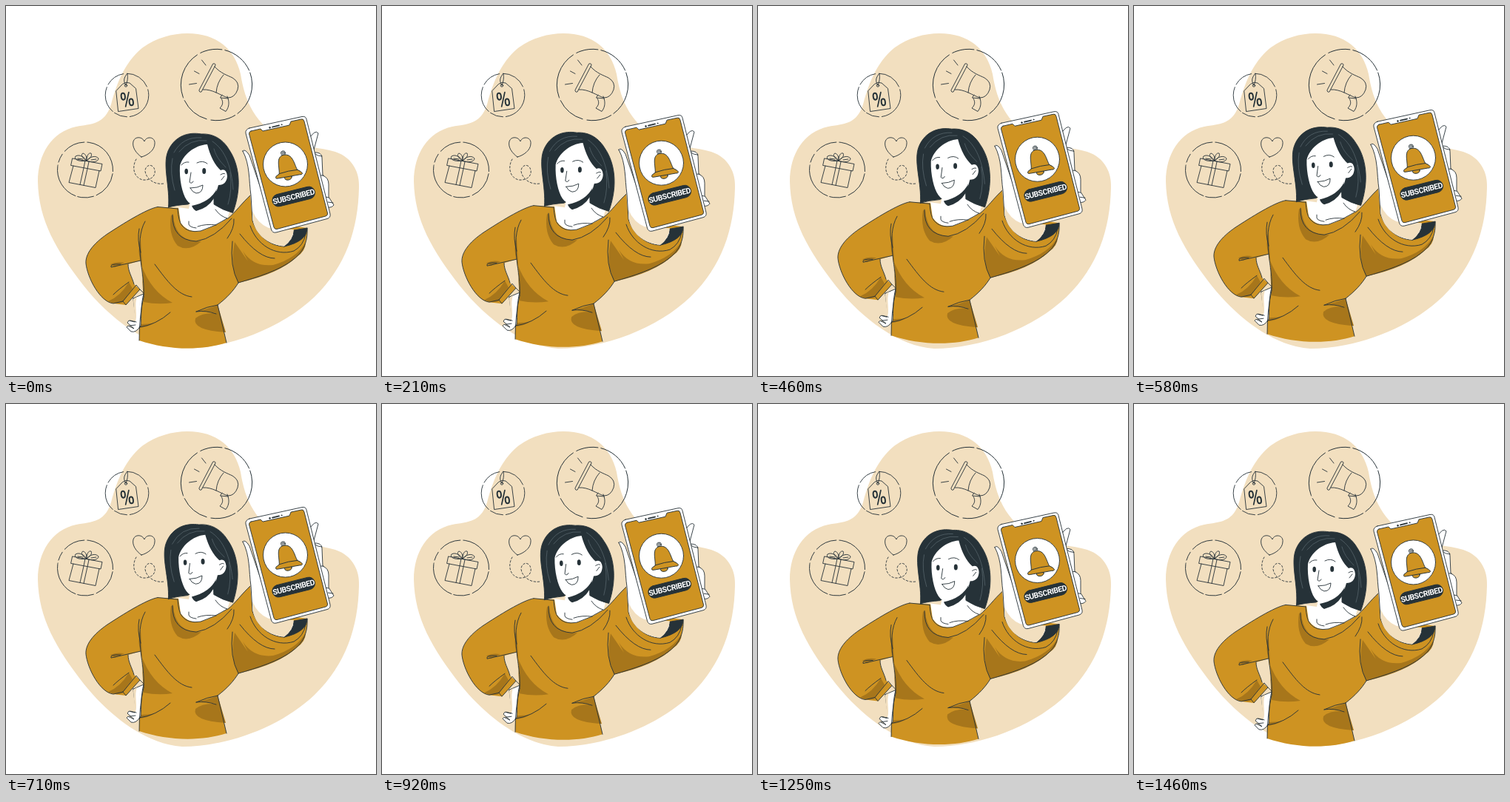
An HTML page for the animation above (1.5 s loop, 500 by 500 pixels).

```html
<!DOCTYPE html>
<html lang="en">
<head>
<meta charset="utf-8">
<title>Subscribed</title>
<style>
  html, body { margin: 0; width: 100%; height: 100%; overflow: hidden; background: #fff; }
  svg { display: block; width: 100%; height: 100%; }
  path, circle, ellipse, rect { fill: none; stroke: #263238; stroke-width: .9; stroke-linecap: round; stroke-linejoin: round; }
  .sand { fill: #f2dfbf; stroke: none; }
  .gold { fill: #ce9322; }
  .shade { fill: #a7761b; stroke: none; }
  .white { fill: #fff; }
  .dark { fill: #263238; }
  .bare { stroke: none; }
  .strand { stroke: #65747b; stroke-width: .6; }
  text { font: 600 10.5px Roboto, sans-serif; font-stretch: 75%; letter-spacing: -.45px; fill: #fff; text-anchor: middle; }
</style>
</head>
<body>
<svg viewBox="0 0 500 500">
  <path class="sand" d="M245 37C285 37 309 58 317 92C323 130 337 160 375 180C400 191 425 191 445 197C469 205 478 226 477 245C476 302 459 352 417 393C372 436 300 463 238 463C190 460 140 422 105 378C68 330 44 290 43 237C43 200 62 170 95 163C115 159 133 161 142 133C152 95 165 72 185 56C203 43 225 37 245 37Z"/>

  <g id="gift">
    <circle cx="107" cy="221.500" r="37.500" stroke-dasharray="38 4 22 3 52 4 12 5 30 4 58 4" transform="rotate(8 107 221.500)"/>
    <path d="M90 206L130 213.500L128 223L88 215.500ZM91 216L85 238.500L121 245.500L126 222.500M107 209L105 219L100 241.500M112 210.500L110 220L105 242.500"/>
    <path d="M109 209C98 211 91 207 94 203C99 200 106 204 109 209C115 212 125 211 125 206C121 201 113 204 109 209C102 205 101 200 104 199C108 200 109 204 109 209C109 203 111 198 115 199C117 203 113 206 109 209M97 206L104 207M115 208L122 207"/>
  </g>

  <g id="tag">
    <circle cx="163.500" cy="120.500" r="29.300" stroke-dasharray="42 4 18 3 36 4 26 5 34 4"/>
    <path d="M149 114.500L157.500 105.500Q162 102 167 104L175.500 111.500L179 138.500L152 142.500ZM162 107C157 100 161 95 164 91C165 97 164 103 162 107"/>
    <circle cx="162" cy="107.500" r="1.700"/>
    <g transform="rotate(-7 164 126)" style="stroke-width:2">
      <ellipse cx="158.800" cy="121.500" rx="2.600" ry="4.500" style="stroke-width:2"/>
      <ellipse cx="168.800" cy="130.500" rx="2.600" ry="4.500" style="stroke-width:2"/>
      <path d="M167 117L160.500 135.500" style="stroke-width:1.700"/>
    </g>
  </g>

  <g id="megaphone">
    <circle cx="284.500" cy="106.500" r="48.200" stroke-dasharray="62 4 34 6 40 4 66 5 30 4 44 4" transform="rotate(-20 284.500 106.500)"/>
    <path d="M280 78Q283 77 283 80L264 116Q261 117 261 114ZM282 82C290 91 300 94 306 97Q316 103 313 113Q309 124 300 124C290 121 279 112 266 113M294 93Q285 103 284 117M292 120L289.500 124L300 125M291 125C294 130 293 134 289 138L297 142.500C302 136 302 129 299 122"/>
    <path d="M264.500 73L270 80M254.500 88L261 91.500M247.500 106L257.500 104.500"/>
  </g>

  <path d="M183 204C176 199 170 191 172 183C174 176 184 176 187 183C190 175 202 177 201 186C201 195 191 202 183 204Z"/>
  <path d="M176 207C170 217 172 232 185 235C198 236 204 227 200 219C196 212 188 216 188 223C189 232 199 242 213 240" stroke-dasharray="2.500 2.500"/>

  <g id="woman">
    <g id="body">
      <path class="gold bare" d="M232 273L205 271.500C190 274 157 295 137 308C118 321 107 335 108 348C110 367 127 400 145 402L162 404L181 383L173 376C170 365 165 359 165 349L182 344C184 361 187 375 186 393Q179 419 180 452C218 465 264 466 298 455L286 404C299 394 308 384 314 374C338 367 371 357 389 342C403 331 408 317 407 300L333 290L330 256C319 266 310 279 300 287Z"/>
      <path class="shade" d="M182 316Q177 331 182 344L186 383ZM183 350Q196 386 225 401Q205 404 186 400ZM223 283Q219 309 232 324Q247 333 264 318Q229 320 226 283ZM138 399Q155 392 166 373L171 382L157 401Q148 404 138 399ZM309 319Q302 352 314 374Q369 362 393 339Q405 331 405 319Q393 341 361 350Q334 353 320 331L327 345ZM258 413Q280 407 286 404L297 441Q251 438 256 422Q265 414 284 415Q270 412 258 413ZM182 430L200 429Q190 434 181 435ZM141 349Q149 345 160 347L147 353Z"/>

      <path class="white" d="M172 395L186 389C182 404 183 420 182 432Q176 442 169 440L163 434L165 432L173 436L164 428L166 425L174 427C176 418 173 408 172 395Z"/>
      <path class="sand" d="M172 396L177 393C173 404 178 415 175 426L172 425C175 415 172 406 172 396Z"/>
      <path d="M167 432L175 431M168 425L176 427"/>

      <path d="M205 271.500C190 274 157 295 137 308C118 321 107 335 108 348C110 367 127 400 145 402L158 399L176 377L181 383L162 404L158 399M232 274L205 271.500M188 291C180 305 180 322 182 344C184 361 187 375 186 393M180 301Q177 316 182 333M182 344L142 353Q140 348 155 349M165 349C165 359 170 365 173 376M181 383L186 388M186 393Q180 419 180 452M166 373Q152 383 145 390M180 434Q203 431 222 414M201 349C218 372 232 391 251 393"/>
      <path d="M286 404C299 394 308 384 314 374C338 367 371 357 389 342C403 331 408 317 407 300M286 404L298 455M257 413Q272 406 286 404M257 413Q270 411 284 416M330 256C319 266 310 279 300 287M299 314Q309 300 308 288M306 318Q302 352 314 374M316 308Q342 341 363 341M330 297C338 322 364 339 389 331Q402 324 405 308"/>

      <path class="white bare" d="M233 272L236 293Q246 307 263 304Q282 298 299 287L302 278L283 266V245L249 264L247 274Z"/>
      <path d="M232 274Q233 291 238 297Q246 307 263 304Q282 298 299 287M225 282Q224 316 257 318Q282 314 305 287M283 275Q289 284 299 287M247 291V295Q248 299 257 300M259 298Q270 294 284 296"/>
    </g>

    <g id="head">
      <path class="dark" d="M219.500 272C222 245 211 215 219 196C228 175 247 170 264 173C281 172 294 181 302 195C314 213 320 243 306.500 279.500Q293 276 281 268V247L246 268Q230 269 219.500 272Z"/>
      <path class="white bare" d="M272 187C255 188 239 201 235 216C234 234 238 253 244 262Q250 271 261 269Q276 264 285 249L287 242Q298 242 299 230Q298 219 290 222Q278 211 272 187Z"/>
      <path class="dark bare" d="M285 247Q276 265 251 270Q253 275 257 277Q273 273 281 260Z"/>
      <path d="M290 228Q295 225 296 227M291 235L295 230"/>
      <ellipse class="dark bare" cx="243.700" cy="223.500" rx="2.300" ry="3.700"/>
      <ellipse class="dark bare" cx="267.700" cy="223" rx="2.500" ry="3.900"/>
      <path d="M237 215Q241 210 247 211M258 212Q266 208 272 213M250 225L248 238Q251 241 253 237"/>
      <path class="white" d="M249 246Q259 246 266 242Q266 253 257 253Q252 252 249 246Z"/>
      <path class="strand" d="M271 182Q249 179 234 197M264 178Q239 176 227 198M279 183C297 195 305 219 307 248M281 193C285 207 292 212 297 218M303 225Q306 249 300 268M225 206Q221 225 228 249"/>
    </g>

    <g id="hand">
      <path class="dark" d="M376 325Q389 311 389 303L407 300Q407 318 376 325Z"/>
      <path class="white" d="M320 196Q323 192 329 202L364 304H389Q389 315 376 325C356 324 340 311 333 290L331 256C328 235 330 215 320 196Z"/>
      <path class="sand" d="M333 277Q340 294 355 300L389 302Q387 317 376 324.500C353 322 337 309 333.500 289Z"/>
      <path class="white" d="M409 180Q418 166 422 172L415 198Q427 197 427 205L428 229Q436 232 436 241V258L443 269Q440 273 434 272L425 240Z"/>
      <path d="M416 199Q421 203 427 203M425 229L429 229M432 258L436 259M435 265L442 266"/>
    </g>

    <g id="phone">
      <path class="white" d="M329 165L400 149.500Q405 148.500 406 153L438 281Q439 286 434 287.500L365 306Q360 307 358.500 302L324 172Q323 167 329 165Z"/>
      <path class="gold" d="M331 169L344 166L347 169L383 161L385 156L399 153Q402 152 403 156L434.500 280Q435 283 432 284L366 301.500Q363 302 362 299L328.500 173Q328 170 331 169Z"/>
      <path d="M360 163.500L369 161.300" style="stroke-width:1.800"/>
      <circle class="dark" cx="356.500" cy="164.300" r=".9"/>
      <circle class="dark" cx="372.500" cy="160.300" r=".5"/>
      <circle class="white" cx="377.500" cy="214" r="30"/>
      <g transform="translate(380.500 215.500) rotate(-10)">
        <circle cx="-3" cy="-17.500" r="3"/>
        <circle cx="-3" cy="-17.500" r="1.400"/>
        <ellipse class="gold" cx="-2" cy="16" rx="5" ry="3.500"/>
        <path class="gold" d="M-13 9C-11 0 -14 -14 -3 -15C10 -15 9 0 12 8Q17 11 18 14Q17 16 14 15H-16Q-20 15 -18 12Z"/>
        <path d="M-13 9Q0 7 12 8"/>
      </g>
      <g transform="translate(388.700 257.500) rotate(-14)">
        <rect class="dark" x="-29.500" y="-8.300" width="59" height="16.600" rx="8.300"/>
        <text y="3.800">SUBSCRIBED</text>
      </g>
    </g>
  </g>
</svg>
<script>
  const period = 1500;
  const woman = document.getElementById("woman");
  const head = document.getElementById("head");

  function draw(now) {
    const lift = (1 - Math.cos(now / period * 2 * Math.PI)) / 2;
    woman.setAttribute("transform", `translate(0 ${-10 * lift})`);
    head.setAttribute("transform", `rotate(${-1.8 * lift} 262 275)`);
    requestAnimationFrame(draw);
  }
  draw(performance.now());
</script>
</body>
</html>
```
